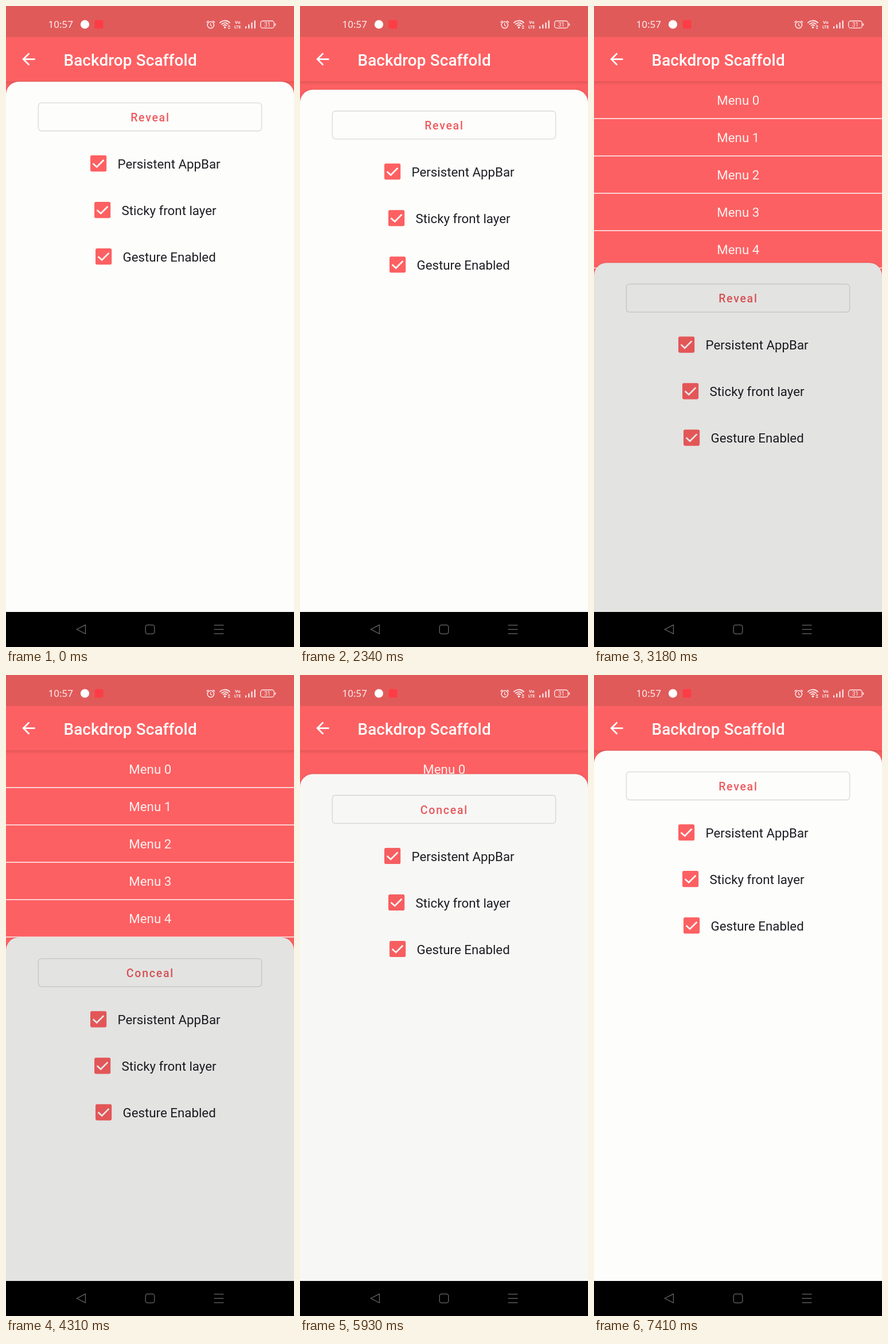
Write an HTML page with a canvas that moves like this. It is 502 px wide and 1116 px high and loops after 8 s.

```html
<!DOCTYPE html>
<html lang="en">
<head>
<meta charset="utf-8">
<title>Backdrop Scaffold</title>
<style>
  html, body { margin: 0; width: 100%; height: 100%; overflow: hidden; background: #000; }
  canvas { display: block; width: 502px; height: 1116px; }
</style>
</head>
<body>
<canvas id="stage"></canvas>
<script>
const W = 502, H = 1116, LOOP = 8;
const RED = '#fd6062', PAPER = '#fdfdfb', INK = '#1e1d24';
const CLOSED = 131.8, OPEN = 456.9, ROW = 65.05, NAV = 1055;
const SANS = 'Roboto, "Noto Sans", sans-serif';
const BODY = '22.3px ' + SANS;

const canvas = document.getElementById('stage');
const ratio = window.devicePixelRatio || 1;
canvas.width = W * ratio;
canvas.height = H * ratio;
const ctx = canvas.getContext('2d');
ctx.scale(ratio, ratio);

const arrow = new Path2D('M20 11H7.83l5.59-5.59L12 4l-8 8 8 8 1.41-1.41L7.83 13H20z');

function rect(x, y, w, h, color) {
  ctx.fillStyle = color;
  ctx.fillRect(x, y, w, h);
}

function roundRect(x, y, w, h, r) {
  ctx.beginPath();
  ctx.roundRect(x, y, w, h, r);
}

function line(points, color, width) {
  ctx.beginPath();
  points.forEach(([x, y]) => ctx.lineTo(x, y));
  stroke(color, width);
}

function stroke(color, width) {
  ctx.strokeStyle = color;
  ctx.lineWidth = width;
  ctx.stroke();
}

function fill(color) {
  ctx.fillStyle = color;
  ctx.fill();
}

function arc(x, y, r, from = 0, to = Math.PI * 2) {
  ctx.beginPath();
  ctx.arc(x, y, r, from, to);
}

function text(str, x, y, font, color, align = 'left', spacing = 0) {
  ctx.font = font;
  ctx.letterSpacing = spacing + 'px';
  ctx.textAlign = align;
  ctx.fillStyle = color;
  ctx.fillText(str, x, y);
}

// Remaining distance of a critically damped spring.
const spring = x => x <= 0 ? 1 : (1 + x) * Math.exp(-x);

// Cubic bezier (.4, 0, .2, 1).
function ease(p) {
  if (p <= 0) return 0;
  if (p >= 1) return 1;
  let lo = 0, hi = 1, s = 0.5;
  for (let i = 0; i < 20; i++) {
    s = (lo + hi) / 2;
    const x = 1.2 * s * (1 - s) ** 2 + 0.6 * s * s * (1 - s) + s ** 3;
    if (x < p) lo = s; else hi = s;
  }
  return s * s * (3 - 2 * s);
}

function panelTop(t) {
  const range = OPEN - CLOSED;
  if (t < 3.48) {
    // The opening lags a little before reaching full speed.
    const x = Math.max(5.37 * (t - 2.279), 6.72 * (t - 2.383));
    return OPEN - range * spring(x);
  }
  if (t < 6.49) return CLOSED + range * spring(6.72 * (t - 5.394));
  return CLOSED;
}

const dimming = t => 0.1 * (ease((t - 2.695) / 0.3) - ease((t - 5.785) / 0.3));

function drawStatus() {
  const white = '#fdeeee';
  rect(0, 0, W, 54, '#e15a5a');
  text('10:57', 73.6, 38, '17px "Noto Sans", sans-serif', white);
  arc(137.5, 32, 7.6);
  fill('#ffffff');
  roundRect(154.5, 24.5, 15, 15, 3);
  fill('#fc3d46');

  // alarm
  arc(356.8, 33, 5.7);
  stroke(white, 1.5);
  line([[356.6, 29.8], [356.6, 33.6], [359.3, 35]], white, 1.3);
  line([[349.6, 28.6], [353, 25.8]], white, 1.5);
  line([[360.6, 25.8], [364, 28.6]], white, 1.5);

  // wifi
  for (const r of [4.5, 8.2, 12]) {
    arc(381.5, 37.5, r, -Math.PI * 0.77, -Math.PI * 0.23);
    stroke(white, 1.8);
  }
  arc(381.5, 37.2, 1.8);
  fill(white);
  line([[387, 36], [388.7, 34.2], [390.4, 36]], white, 1.2);
  line([[387, 37.6], [388.7, 39.4], [390.4, 37.6]], white, 1.2);

  text('Vo', 403.7, 31.2, 'bold 8px ' + SANS, white, 'center');
  text('LTE', 403.7, 39.3, 'bold 7px ' + SANS, white, 'center');

  for (let i = 0; i < 4; i++) {
    const h = 4 + i * 3.4;
    roundRect(417 + i * 5.2, 39.3 - h, 2.2, h, 1);
    fill(white);
  }

  roundRect(443.7, 26, 23.6, 12.4, 4);
  stroke(white, 1.3);
  rect(468.6, 30.3, 1.6, 4, white);
  text('31', 455.5, 35.7, '10px ' + SANS, white, 'center');
}

function drawBack() {
  rect(0, 54, W, NAV - 54, RED);
  const shade = ctx.createLinearGradient(0, 131, 0, 138);
  shade.addColorStop(0, 'rgba(0,0,0,.1)');
  shade.addColorStop(1, 'rgba(0,0,0,0)');
  rect(0, 131, W, 7, shade);

  ctx.save();
  ctx.translate(22.7, 75.8);
  ctx.scale(1.394, 1.394);
  ctx.fillStyle = '#fff';
  ctx.fill(arrow);
  ctx.restore();
  text('Backdrop Scaffold', 100.4, 103.5, '500 27.9px ' + SANS, '#fff', 'left', 0.12);

  for (let i = 0; i < 5; i++) {
    const y = i * ROW;
    text('Menu ' + i, 251.3, 172 + y, BODY, '#fff0f0', 'center');
    rect(0, 195.3 + y, W, 1.4, '#fff');
  }
}

function drawOption(label, x, y) {
  roundRect(x, y - 14.1, 28.2, 28.2, 2.8);
  fill(RED);
  line([[x + 4.6, y], [x + 11.2, y + 6], [x + 23.4, y - 6.2]], '#fff', 2.7);
  text(label, x + 47.5, y + 8.8, BODY, INK);
}

function drawFront(top, dim, label) {
  ctx.save();
  ctx.shadowColor = 'rgba(0,0,0,.16)';
  ctx.shadowBlur = 3 * ratio;
  roundRect(0, top, W, H - top, [22.3, 22.3, 0, 0]);
  fill(PAPER);
  ctx.restore();

  ctx.save();
  ctx.translate(0, top);
  roundRect(56.4, 36.9, 389.2, 48.8, 5.3);
  stroke('rgba(0,0,0,.14)', 1.3);
  text(label, 251.4, 69.3, '500 19.5px ' + SANS, '#ee5a5e', 'center', 1.74);
  drawOption('Persistent AppBar', 147, 142.4);
  drawOption('Sticky front layer', 154, 223.4);
  drawOption('Gesture Enabled', 156, 304.4);
  ctx.restore();

  if (dim > 0) {
    roundRect(0, top, W, H - top, [22.3, 22.3, 0, 0]);
    fill(`rgba(0,0,0,${dim})`);
  }
}

function drawNav() {
  const gray = '#686868';
  rect(0, NAV, W, H - NAV, '#000');
  ctx.beginPath();
  ctx.moveTo(123.3, 1085.3);
  ctx.lineTo(138.4, 1077.6);
  ctx.lineTo(138.4, 1093);
  ctx.closePath();
  stroke(gray, 1.2);
  roundRect(243.2, 1077.6, 15.6, 15.6, 3.6);
  stroke(gray, 1.3);
  for (const y of [1078, 1085.4, 1092.8]) line([[362.6, y], [379.4, y]], gray, 1.3);
}

function draw(now) {
  const t = (now / 1000) % LOOP;
  const label = t >= 3.74 && t < 6.78 ? 'Conceal' : 'Reveal';
  drawBack();
  drawFront(panelTop(t), dimming(t), label);
  drawStatus();
  drawNav();
}

let start;
function tick(now) {
  start ??= now;
  draw(now - start);
  requestAnimationFrame(tick);
}
draw(0);
requestAnimationFrame(tick);
</script>
</body>
</html>
```
